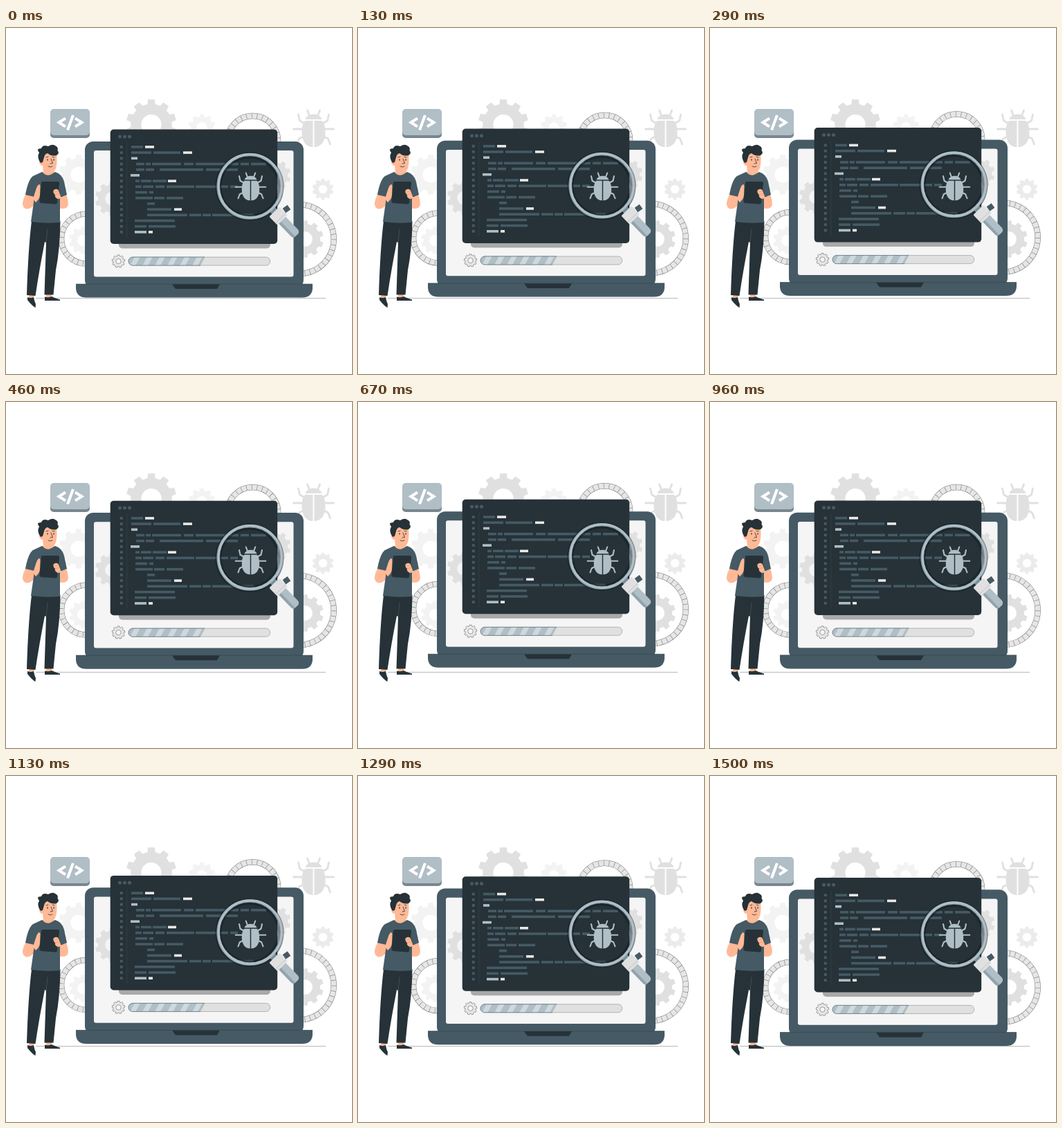
These frames come from a looping animation (500x500 px, 1540 ms). An HTML page:

```html
<!DOCTYPE html>
<html lang="en">
<head>
<meta charset="utf-8">
<title>Debugging</title>
<style>
  html, body { margin: 0; width: 100%; height: 100%; overflow: hidden; background: #fff; }
  svg { display: block; width: 100vw; height: 100vh; }
  .line { fill: none; stroke-linecap: round; stroke-linejoin: round; }
  .dark { fill: #263238; }
  .slate { fill: #455a64; }
  .mist { fill: #b0bec5; }
  .skin { fill: #ffb996; }
</style>
</head>
<body>
<svg viewBox="0 0 500 500">
  <defs>
    <g id="bug">
      <path d="M-1-11V27C-12 27-17 17-17 6C-17-3-15-9-12-11ZM1-11V27C12 27 17 17 17 6C17-3 15-9 12-11Z"/>
      <path d="M-12-13C-9-23 9-23 12-13Z"/>
      <path class="line" stroke="currentColor" stroke-width="2.800" d="M-6-18L-9-26M6-18L9-26
        M-13-7L-20-11L-22-20M13-7L20-11L22-20M-16 1L-29 1M16 1L29 1M-15 12L-21 15L-24 23M15 12L21 15L24 23"/>
    </g>
    <clipPath id="fill"><path d="M183 331.500H287.500L281 343.500H183A6 6 0 0 1 183 331.500Z"/></clipPath>
  </defs>

  <g id="backGears"></g>
  <use href="#bug" x="444.500" y="145" fill="#e0e0e0" color="#e0e0e0"/>
  <path d="M43 390.500H462" stroke="#a6a6a6" stroke-width=".8"/>

  <g id="float">
    <g id="tubes"></g>
    <rect class="slate" x="114" y="164.300" width="316" height="212" rx="12"/>
    <rect x="127" y="177.500" width="288.500" height="182.300" rx="3" fill="#f5f5f5"/>
    <path class="slate" d="M101 370.300H443V377Q442 390 428 390H116Q102 390 101 377Z"/>
    <path d="M101 370.500H443" stroke="#37474f" stroke-width=".7"/>
    <path class="dark" d="M240 370.700H309L305 377.500H245Z"/>
    <g id="screenGears"></g>

    <rect x="163" y="300" width="219" height="19" rx="5" fill="#a9a9a9"/>
    <rect class="dark" x="150.700" y="147" width="241.500" height="165.500" rx="5"/>
    <g class="slate">
      <circle cx="164.500" cy="157.300" r="2.500"/><circle cx="171.500" cy="157.300" r="2.500"/><circle cx="178.500" cy="157.300" r="2.500"/>
    </g>
    <path d="M174.700 166V303" stroke="#37474f" stroke-width=".6"/>
    <g id="code"></g>

    <rect x="177.300" y="331.500" width="204.500" height="12" rx="6" fill="#e0e0e0" stroke="#8a8f92" stroke-width=".6"/>
    <g clip-path="url(#fill)">
      <rect class="mist" x="177" y="331" width="112" height="13"/>
      <g id="stripes" fill="#cfd8dc"></g>
    </g>
    <path d="M287 331.500H183A6 6 0 0 0 183 343.500H281" fill="none" stroke="#546e7a" stroke-width=".7"/>
    <g id="smallGear" stroke="#777" stroke-width=".7"></g>

    <circle cx="352" cy="229.500" r="45" fill="none" stroke="#101a1f" stroke-opacity=".5" stroke-width="9"/>
    <g transform="translate(352.500 229) rotate(46)">
      <rect x="46" y="-5" width="8" height="10" fill="#78909c"/>
      <rect class="mist" x="64" y="-6.500" width="34" height="14" rx="5"/>
      <path d="M66 7.500H93Q98 7.500 98 3.500H66Z" fill="#90a4ae"/>
      <rect x="51" y="-10" width="17" height="20.500" rx="1.500" fill="#e0e0e0"/>
      <path d="M64-10V10" stroke="#bdbdbd" stroke-width=".8"/>
    </g>
    <path d="M402 264.500L409 259.500" stroke="#455a64" stroke-width="8"/>
    <circle cx="352.300" cy="229.200" r="45.700" fill="none" stroke="#78909c" stroke-width="4.500"/>
    <circle cx="352.800" cy="228.800" r="45.700" fill="none" stroke="#b0bec5" stroke-width="3.300"/>
  </g>

  <use href="#bug" transform="translate(353.500 229) scale(.75)" class="mist" color="#b0bec5"/>

  <rect x="64" y="121" width="57" height="38" rx="5" fill="#78868d"/>
  <rect class="mist" x="64" y="117" width="57" height="38" rx="5"/>
  <path class="line" style="stroke-linecap:butt;stroke-linejoin:miter" stroke="#fff" stroke-width="4"
    d="M86 130.500L76.500 136.500L86 142.500M97 126L89 147.500M100 130.500L109.500 136.500L100 142.500"/>

  <g id="man">
    <path class="skin" d="M33 385H41L40 391H33ZM58 384H66V390H58Z"/>
    <path class="dark" d="M31 389Q36 391 40 389Q41 395 43 399L42.500 404Q38 402 31 393ZM56 388.500Q62 390 66 388Q72 391 78 392.500V394H56Z"/>
    <path class="dark" d="M37 279H78.500Q78 320 72 350L68.500 385.500H55.500L58 310L56 309Q48 350 42.500 387L30 386Q32 320 37 279Z"/>
    <path d="M58 310L60 290" stroke="#455a64" stroke-width=".7"/>
    <path class="skin" d="M29 239L44 242L46 230L50 226L50 244L46 251Q34 264 28 261Q22 258 25 248ZM76 242L86 238Q91 250 89.500 257Q86 263 76 260L70 252Z"/>
    <path class="slate" d="M52 208Q62 214 71 208Q81 211 84 222L88 241L78 245V281Q57 283 36 280Q39 260 41 244L28 241Q32 219 39 214Z"/>
    <path d="M41 245L44 230M78 245L77 232" stroke="#37474f" stroke-width=".7"/>
    <path class="skin" d="M53 197L54 210Q61 216 69 209L67 203Z"/>
    <path class="skin" d="M52 184Q58 179 73 181Q75 202 69 208Q60 210 54 199Q48 199 48 193Q49 188 53 191Z"/>
    <path class="dark" d="M50 195Q44 187 48 180Q43 174 51 174Q53 168 61 171Q67 167 71 170Q76 172 74.500 177Q78 181 73 184Q66 186 60 181Q56 182 55 187L53 194Z"/>
    <path class="line" stroke="#263238" stroke-width=".8" d="M58 187L61 186M67 186L70 187M65 189L67.500 195.500L64 196M61 200Q64 202 67 200"/>
    <circle class="dark" cx="60" cy="190.500" r=".9"/><circle class="dark" cx="69" cy="190.500" r=".9"/>
    <path class="dark" d="M53 222H75Q77.500 222 77 225L74 252Q74 254.500 71 254.500L51 253Q48 252 48.500 250L51 224Q51 222 53 222Z"/>
    <path class="skin" d="M39 247L44 231Q48 223 49.500 228L49 241Q49 247 43 252ZM69 234Q74 231 76 235L80 246L75 247Q70 245 71 241Q67 238 69 234Z"/>
    <path class="line" stroke="#e58b62" stroke-width=".6" d="M70 237L75 236M71 241L76 240"/>
  </g>
</svg>
<script>
const LOOP = 1540, LEAD = 48, RISE = 6.6;
const byId = id => document.getElementById(id);
const add = (id, markup) => byId(id).insertAdjacentHTML('beforeend', markup);

function gear(id, x, y, r, color, teeth = 10, hole = .4) {
  const step = 2 * Math.PI / teeth;
  const points = [];
  for (let i = 0; i < teeth; i++) {
    for (const [turn, size] of [[-.3, .82], [-.21, 1], [.21, 1], [.3, .82]]) {
      const a = (i + turn) * step - Math.PI / 2;
      points.push((x + r * size * Math.cos(a)).toFixed(2) + ' ' + (y + r * size * Math.sin(a)).toFixed(2));
    }
  }
  const h = r * hole;
  add(id, `<path fill="${color}" fill-rule="evenodd" d="M${points.join('L')}Z
    M${x - h} ${y}a${h} ${h} 0 1 0 ${2 * h} 0a${h} ${h} 0 1 0 ${-2 * h} 0Z"/>`);
}

function tube(d) {
  for (const [color, width, dash] of [['#777', 8.4, ''], ['#e6e6e6', 7.4, ''], ['#888', 7.4, '.7 7']]) {
    add('tubes', `<path d="${d}" fill="none" stroke="${color}" stroke-width="${width}" stroke-dasharray="${dash}"/>`);
  }
}

gear('backGears', 210, 139.5, 36.5, '#e0e0e0');
gear('backGears', 283, 144, 19.5, '#f3f3f3');
gear('backGears', 105, 212, 29, '#f3f3f3');
gear('backGears', 111, 307, 20, '#f3f3f3');
gear('backGears', 432, 305, 27, '#e0e0e0');
gear('backGears', 458, 233, 15.5, '#ebebeb');
gear('screenGears', 153, 247, 24.5, '#e0e0e0');
gear('screenGears', 389, 213, 22.5, '#e0e0e0');
gear('smallGear', 162.5, 337.5, 9.3, '#e8e8e8', 9);

tube('M320.500 170A36.500 36.500 0 1 1 392.500 170');
tube('M116 269A36 36 0 0 0 116 341');
tube('M403 260A50 50 0 1 1 422.500 355.500');

// Each entry is start-end, with an optional tone: w = white, m = mist.
const rows = `181-198 201-214w|181-210 213-252 256-269w|181-190m
188-200 202-209 211-253 257-271 274-336 339-351 354-376|188-200 202-214 222-285 289-335|180-193m
187-193 195-210 212-232 234-246w|187-196 198-213 216-229 232-272 274-321 324-335|187-204 207-213
187-212 214-229 232-256|204-215|204-239 243-254w|204-262 265-282 284-296 298-358|186-244
186-203 206-245|186-203m 206-212w`.split(/[|\n]/);
const tones = { w: '#e8e8e8', m: '#b0bec5' };
rows.forEach((row, i) => {
  const y = 172.3 + i * 8.2;
  add('code', `<rect class="slate" x="164.800" y="${y - 1.9}" width="4" height="3.800" rx=".6"/>`);
  for (const [, from, to, tone] of row.matchAll(/(\d+)-(\d+)(\w?)/g)) {
    add('code', `<rect x="${from}" y="${y - 1.8}" width="${to - from}" height="3.600" fill="${tones[tone] || '#455a64'}"/>`);
  }
});

for (let x = 186; x < 285; x += 18) add('stripes', `<path d="M${x} 331h8l-7 13h-8Z"/>`);

const float = byId('float');
function draw(now) {
  const phase = (now + LEAD) / LOOP % 1;
  const lift = RISE * (1 - Math.abs(1 - 2 * phase));
  float.setAttribute('transform', `translate(0 ${-lift})`);
  requestAnimationFrame(draw);
}
draw(performance.now());
</script>
</body>
</html>
```
